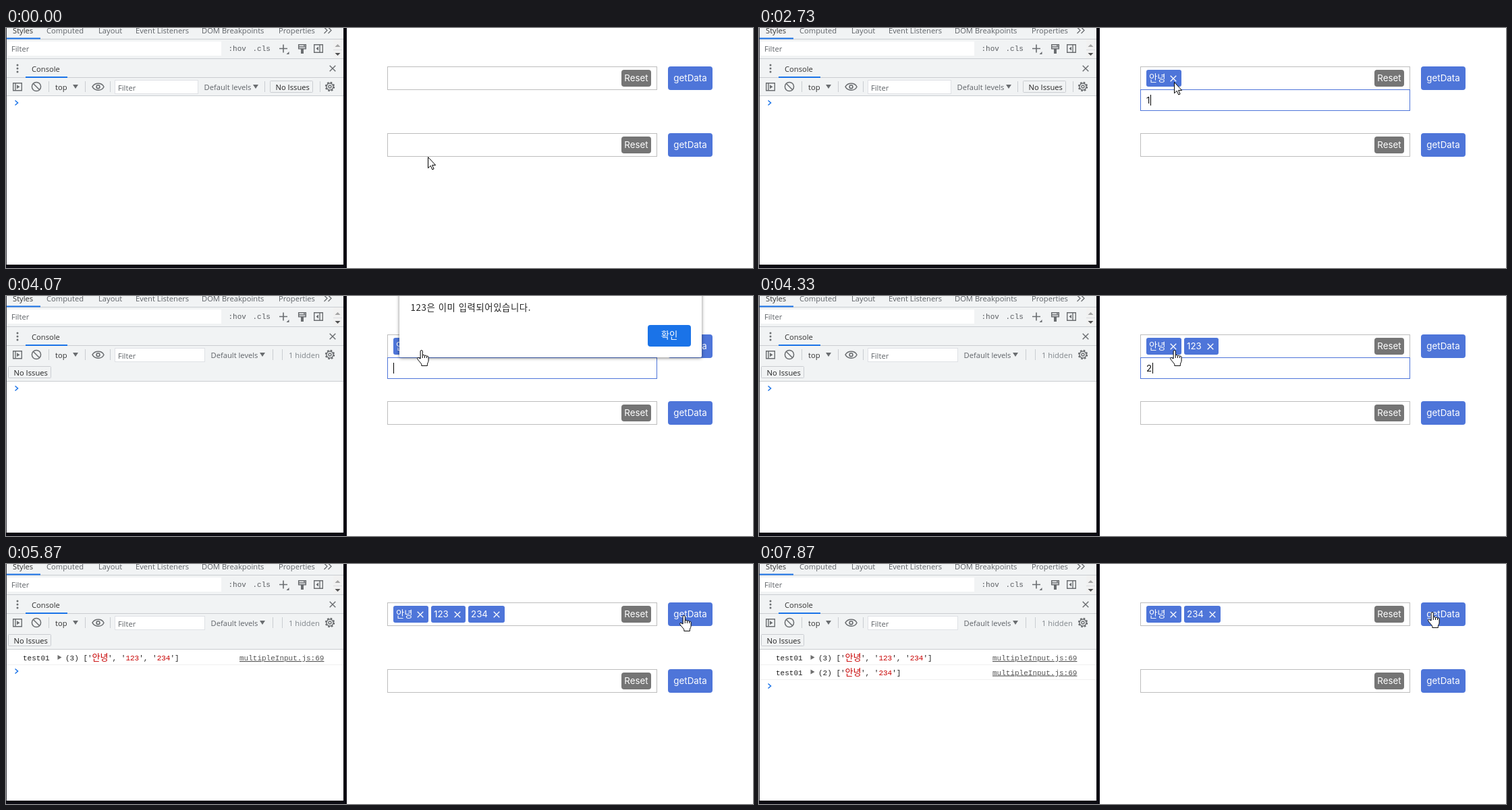
Recreate the animation shown at these times as an HTML page. Size 1107x356 px, loop 8 s.

```html
<!DOCTYPE html>
<html lang="ko">
<head>
<meta charset="utf-8">
<title>Multiple input</title>
<style>
  html, body { margin: 0; width: 100%; height: 100%; overflow: hidden; background: #fff; }
  svg { display: block; width: 1107px; height: 356px; }
  text { white-space: pre; }
  .ui { font: 11.2px 'Open Sans', 'Noto Sans', sans-serif; }
  .mono { font: 11px 'Liberation Mono', 'Noto Sans CJK KR', 'Noto Sans CJK', monospace; }
  .page { font: 13.333px Inter, 'Noto Sans CJK KR', 'Noto Sans CJK', sans-serif; }
  .alert { font: 13.333px 'Noto Sans CJK KR', 'Noto Sans CJK', sans-serif; }
  .box { filter: drop-shadow(0 1px 2.5px rgba(0, 0, 0, .5)); }
</style>
</head>
<body>
<svg id="stage" viewBox="0 0 1107 356">
  <g id="base"></g>
  <g id="live"></g>
</svg>
<script>
const LOOP = 8000, FPS = 15;
const BLUE = '#4e75d9', ACCENT = '#1a73e8', BAR = '#f1f3f4', LINE = '#cacdd1', ICON = '#6a6d70', INK = '#333';

const rect = (x, y, w, h, fill, more = '') =>
  `<rect x="${x}" y="${y}" width="${w}" height="${h}" fill="${fill}" ${more}/>`;
const frame = (x, y, w, h, stroke, fill = '#fff', rx = 0) =>
  rect(x + .5, y + .5, w - 1, h - 1, fill, `stroke="${stroke}" rx="${rx}"`);
const text = (x, y, s, cls = 'ui', fill = INK, more = '') =>
  `<text x="${x}" y="${y}" class="${cls}" fill="${fill}" ${more}>${s}</text>`;
const stroke = (d, color = ICON, w = 1.3) =>
  `<path d="${d}" fill="none" stroke="${color}" stroke-width="${w}"/>`;
const fill = (d, color = ICON) => `<path d="${d}" fill="${color}"/>`;
const ring = (x, y, r, w = 1.4, more = '') =>
  `<circle cx="${x}" cy="${y}" r="${r}" fill="none" stroke="${ICON}" stroke-width="${w}" ${more}/>`;
const cross = (x, y, r, color, w) =>
  stroke(`M${x - r} ${y - r}l${2 * r} ${2 * r}m0 ${-2 * r}l${-2 * r} ${2 * r}`, color, w);
const down = (x, y) => fill(`M${x - 4} ${y - 3}h8l-4 6z`);
const sep = x => rect(x, 79, 1, 16, LINE);
const middle = 'text-anchor="middle"';

function tools() {
  const tabs = [[10, 'Styles'], [60, 'Computed'], [137, 'Layout'], [192, 'Event Listeners'],
    [290, 'DOM Breakpoints'], [404, 'Properties']];
  return rect(0, 0, 505, 356, '#0b0a12') + rect(1, 0, 499, 351, '#fff') + rect(0, 0, 1, 351, '#3c3c44') +
    rect(1, 0, 499, 100, BAR) +
    tabs.map(([x, s], i) => text(x, 8, s, 'ui', i ? '#5f6368' : INK)).join('') +
    stroke('M471.5 -1l4.5 4.5-4.5 4.5M477.5 -1l4.5 4.5-4.5 4.5') +
    rect(1, 16, 499, 1, LINE) + rect(1, 14.5, 50, 2, ACCENT) +
    rect(2, 20, 317, 21, '#fff') + text(8, 35, 'Filter', 'ui', '#5f6368') +
    text(329.5, 34, ':hov', 'mono', '#5a5d61', 'font-weight="700"') +
    text(365.5, 34, '.cls', 'mono', '#5a5d61', 'font-weight="700"') +
    stroke('M405 30.5h12M411 24.5v12', ICON, 1.6) + fill('M419.5 35v4h-4z') +
    stroke('M433.7 24.7h10.6v6h-10.6zM433.7 28h10.6M442 24v3', ICON, 1.5) + rect(437, 31, 4, 7, ICON) +
    stroke('M456.7 24.7h12.6v11.6h-12.6zM465 24.7v11.6', ICON, 1.4) + fill('M463 27.5v6l-3.5-3z') +
    rect(485, 17, 13, 28, '#f1f1f1') + rect(485, 32, 13, 1, '#dadce0') +
    fill('M487.5 28h8l-4-4z', '#a3a3a3') + fill('M487.5 37h8l-4 4z', '#505050') +
    rect(1, 45, 499, 1, LINE) +
    [55, 60, 65].map(y => `<circle cx="17" cy="${y}" r="1.5" fill="${ICON}"/>`).join('') +
    text(38, 65, 'Console') + cross(484, 60, 4.3, ICON, 1.4) +
    rect(1, 73, 499, 1, LINE) + rect(29, 72, 62, 2, ACCENT) +
    stroke('M10.7 81.7h12.6v11h-12.6zM14 81.7v11', ICON, 1.4) + fill('M16 84.2v6l4.5-3z') +
    ring(45, 87, 6.6, 1.5) + stroke('M40.5 82.5l9 9', ICON, 1.5) +
    sep(63) + text(73, 92, 'top') + down(103, 87) + sep(117) +
    stroke('M128 87.2c3.5-6.6 14-6.6 17 0c-3 6.6-13.500 6.600-17 0z', ICON, 1.5) + ring(136.5, 87.2, 2.4, 1.6) +
    sep(154) +
    ring(480, 87, 6.2, 2, 'stroke-dasharray="2.6 2.27"') + ring(480, 87, 5) + ring(480, 87, 2);
}

function row(y) {
  const button = (x, w, h, dy, s, color) =>
    rect(x, y + dy, w, h, color, 'rx="4"') + text(x + w / 2, y + 22.3, s, 'page', '#fff', middle);
  return frame(565, y, 400, 35, '#bdbdbd') +
    button(912, 44, 25, 5, 'Reset', '#757575') + button(981, 66, 35, 0, 'getData', BLUE);
}

// Each entry: step, settled text, character still being composed
const TYPED = [[7, '', ''], [11, '', 'ㅇ'], [18, '', '아'], [19, '', '안'], [22, '안', 'ㄴ'], [23, '안', '냐'],
  [25, '안', '냥'], [31, '안', 'ㄴ'], [34, '안', '녀'], [35, '안', '녕'], [37, '안녕', ''], [38, '', ''],
  [40, '1', ''], [42, '12', ''], [44, '123', ''], [48, '', ''], [49, '1', ''], [50, '12', ''], [51, '123', ''],
  [61, '', ''], [65, '2', ''], [66, '23', ''], [67, '234', ''], [71, '', '']];
const TAGS = [[38, '안녕'], [48, '123', 106], [71, '234']];
const PATH = [[0, 625, 191], [2, 622, 163], [4, 617, 105], [6, 615, 80], [74, 615, 80], [80, 640, 75],
  [83, 800, 68], [85, 930, 70], [87, 1004, 76], [91, 1004, 76], [93, 985, 90], [96, 820, 119], [98, 670, 108],
  [99, 626, 95], [101, 662, 80], [104, 667, 77], [108, 667, 77], [111, 800, 56], [114, 985, 66],
  [116, 997, 70], [118, 997, 71]];

const charWidth = c => c === '1' ? 6 : c < ':' ? 8.6 : 12;
const widthOf = s => [...s].reduce((sum, c) => sum + charWidth(c), 0);

function tagsAt(k) {
  let x = 574;
  return TAGS.filter(([from, , to = 999]) => k >= from && k < to).map(([, s]) => {
    const tag = { s, x, w: Math.round(widthOf(s) + 28) };
    x += tag.w + 4;
    return tag;
  });
}

function console_(k) {
  const wrapped = k >= 61, d = wrapped ? 10 : 0, top = wrapped ? 126 : 100;
  const issuesX = wrapped ? 3 : 391, issuesY = wrapped ? 104 : 78;
  let out = rect(1, 100, 499, top - 100, BAR) + rect(1, top, 499, 1, LINE) +
    frame(161, 77, 124 + d, 21, '#dfe1e5') + text(166, 93, 'Filter', 'ui', '#5f6368') +
    text(293.5 + d, 92, 'Default levels', 'ui', '#5f6368') + down(371 + d - 1, 87) +
    (wrapped ? sep(395) + sep(409) + text(419, 92, '1 hidden', 'ui', '#80868b') : sep(383) + sep(465)) +
    frame(issuesX, issuesY, 64, 18, LINE, BAR, 1) + text(issuesX + 8.5, issuesY + 14, 'No Issues', 'ui', '#222');
  const logs = [[88, ['123', '234']], [116, ['234']]].filter(([from]) => k >= from);
  logs.forEach(([, rest], i) => { out += logLine(143 + 21.500 * i, rest); });
  const y = top + 11 + 22 * logs.length;
  return out + stroke(`M13.500 ${y - 3.500}l4 3.500-4 3.500`, ACCENT, 1.5);
}

function logLine(y, rest) {
  const red = (s, more = '') => `<tspan fill="#c80000" ${more}>${s}</tspan>`;
  const tail = rest.map(s => `', '${red(s)}`).join('');
  return text(25, y, 'test01', 'mono', '#222') + fill(`M76.500 ${y - 8}v7l6-3.500z`, '#6e6e6e') +
    text(88, y, `(${rest.length + 1}) ['${red('안녕', 'font-size="13"')}<tspan x="151">${tail}']</tspan>`,
      'mono', '#222', 'font-style="italic"') +
    text(346, y, 'multipleInput.js:69', 'mono', '#545454', 'text-decoration="underline"') +
    rect(1, Math.round(y + 6), 499, 1, '#f0f0f0');
}

function field(k, tags) {
  let out = tags.map(({ s, x, w }) => rect(x, 62, w, 25, BLUE, 'rx="3"') +
    text(x + 4, 79.3, s, 'page', '#fff') + cross(x + w - 12, 75, 4.3, '#fff', 1.3)).join('');
  if (k < 7 || k >= 87) return out;
  const [, done, part] = TYPED.filter(e => e[0] <= k).pop();
  const start = 574 + widthOf(done), end = Math.round(start + widthOf(part));
  out += frame(565, 91, 400, 32, BLUE) + text(574, 112, done + part, 'page', '#111');
  if (part) out += rect(start, 113, 12, 1, '#111');
  if (k < 79 || k > 85) out += rect(end, 99, 1, 16, '#000');
  return out;
}

function alertBox(k) {
  const alpha = k < 60 ? Math.min(1, (k - 54) / 3) : Math.min(1, (64 - k) / 3);
  if (alpha <= 0) return '';
  return `<g opacity="${alpha}">` + rect(583, -20, 448, 111, '#fff', 'rx="2" class="box"') +
    text(599.5, 21.5, '123은 이미 입력되어있습니다.', 'alert', '#222', 'letter-spacing=".6"') +
    rect(951, 43, 64, 32, ACCENT, 'rx="4"') + text(983, 63, '확인', 'alert', '#fff', middle) + '</g>';
}

function pointer(k, tags) {
  const i = PATH.findIndex(p => p[0] > k);
  const [k0, x0, y0] = PATH.at(i < 0 ? -1 : i - 1), [k1, x1, y1] = PATH.at(i);
  const f = k1 > k0 ? (k - k0) / (k1 - k0) : 0;
  const x = Math.round(x0 + (x1 - x0) * f), y = Math.round(y0 + (y1 - y0) * f);
  const near = t => Math.abs(x - t.x - t.w + 12) < 9 && Math.abs(y - 75) < 9;
  const onButton = y > 57 && y < 92 && (x > 981 || (x > 912 && x < 956));
  const shape = k >= 55 && (onButton || tags.some(near))
    ? `<path d="M-.9 13V2.1a1.600 1.600 0 0 1 3.200 0V8.400c.4-1.500 3-1.400 3.200.4c.6-1.200 2.900-.9 3 .8c.6-1 2.600-.5 2.600 1.200V16c0 2-1.600 3.400-1.700 5.400v2H.8v-2C.3 19.600-3.400 16.600-5.200 13.400c-.9-1.700 1-2.900 2.300-1.500z" stroke-linejoin="round"/><path d="M2.300 8.400v3.600M5.500 8.800v3.200M8.500 9.600v2.400"/>`
    : '<path d="M.5.5V16.800l3.800-3.500 2.500 5.700 2.300-1-2.500-5.600h5z"/>';
  return `<g transform="translate(${x} ${y})" fill="#fff" stroke="#000">${shape}</g>`;
}

const live = document.getElementById('live');
document.getElementById('base').innerHTML = tools() + row(57) + row(156);

let shown = -1;
function draw(now) {
  const k = Math.floor((now % LOOP) * FPS / 1000 + .06);
  if (k !== shown) {
    const tags = tagsAt(k);
    live.innerHTML = console_(k) + field(k, tags) + alertBox(k) + pointer(k, tags);
    shown = k;
  }
}

const begin = performance.now();
function tick() {
  draw(performance.now() - begin);
  requestAnimationFrame(tick);
}
tick();
</script>
</body>
</html>
```
